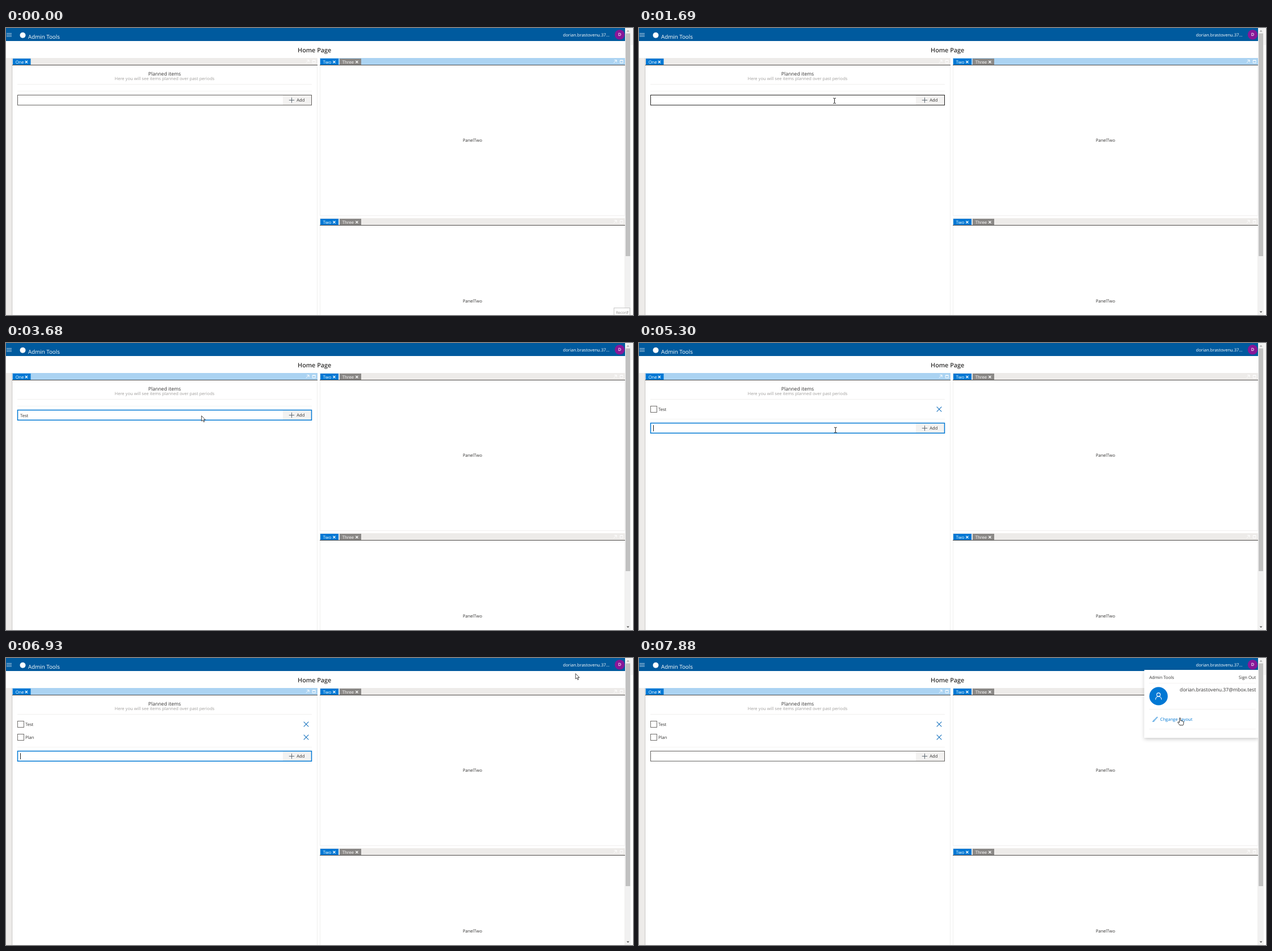
Write an HTML page that moves like this. It is 1105 px wide and 507 px high and loops after 8000 ms.

```html
<!DOCTYPE html>
<html lang="en">
<head>
<meta charset="utf-8">
<title>Admin Tools</title>
<style>
  html, body { margin: 0; width: 100%; height: 100%; overflow: hidden; background: #fff; }
  svg { display: block; width: 1105px; height: 507px; }
  text { font-family: "Open Sans", "Noto Sans", sans-serif; font-size: 7.6px; fill: #323130;
         text-rendering: geometricPrecision; white-space: pre; }
  .mid { text-anchor: middle; }
  .end { text-anchor: end; }
  .white { fill: #fff; }
  .line { fill: none; }
</style>
</head>
<body>
<svg id="stage" viewBox="0 0 1105 507" xmlns="http://www.w3.org/2000/svg"></svg>
<script>
const LOOP = 8000, BLUE = '#0078d4', GREY = '#edebe9', LIT = '#abd3f2';

const rect = (x, y, w, h, fill, more = '') =>
  `<rect x="${x}" y="${y}" width="${w}" height="${h}" fill="${fill}" ${more}/>`;
const path = (d, stroke, width, more = '') =>
  `<path class="line" d="${d}" stroke="${stroke}" stroke-width="${width}" ${more}/>`;
const text = (x, y, s, cls = '', more = '') => `<text x="${x}" y="${y}" class="${cls}" ${more}>${s}</text>`;
const size = (px, more = '') => `style="font-size:${px}px;${more}"`;
const cross = (x, y, r, stroke, width) =>
  path(`M${x - r} ${y - r}l${2 * r} ${2 * r}m0 ${-2 * r}l${-2 * r} ${2 * r}`, stroke, width);

function tab(x, y, w, label, fill) {
  return rect(x, y + 1, w, 11, fill) + text(x + 4.7, y + 9.8, label, 'white')
    + cross(x + w - 7.6, y + 7, 2.1, '#fff', 1.3);
}

function panelIcons(x, y) {
  return path(`M${x - 2.5} ${y + 2.5}l5 -5m-3.8 0h3.8v3.8`, '#fff', 1)
    + path(`M${x + 8.7} ${y - 2.3}h5v4.8h-5zm0 .6h5`, '#fff', 0.9);
}

function panel(id, x, y, h, tabs) {
  const w = 538;
  return rect(x + 0.5, y + 0.5, w - 1, h, '#fff', 'stroke="#f0efee"')
    + rect(x, y, w, 12, GREY, `id="${id}"`)
    + tabs + panelIcons(x + 520.5, y + 6.2)
    + rect(x, y + 12, w, 1, '#4c4a48');
}

const pair = y => tab(554, y, 32, 'Two', BLUE) + tab(588, y, 38, 'Three', '#8a8886');

function item(y, label) {
  return `<g visibility="hidden">`
    + rect(20.5, y - 5.5, 11, 11, '#fff', 'stroke="#605e5c" stroke-width=".9"')
    + text(34, y + 2.9, label) + cross(529, y, 4.3, '#1a74bf', 1.1) + '</g>';
}

const header = rect(0, 0, 1091, 23, '#005a9e')
  + path('M1 9.6h9m-9 2.6h9m-9 2.6h9', '#dfeaf4', 0.8)
  + '<circle cx="29.5" cy="12.7" r="5" fill="#fff"/>'
  + text(39, 18.9, 'Admin Tools', 'white', size(9.75))
  + text(1063.5, 14.5, 'dorian.brastovenu.37...', 'white end')
  + '<circle cx="1081.5" cy="11.7" r="8.8" fill="#881798"/>'
  + text(1081.4, 14.4, 'D', 'white mid', size(7.4, 'font-weight:600'))
  + text(543.7, 42.5, 'Home Page', 'mid', size(10.8, 'font-weight:600'));

const panels = rect(0, 53, 11, 454, GREY) + rect(10, 53, 1, 454, '#d2d0ce')
  + panel('left', 11, 53, 460, tab(12, 53, 31.5, 'One', BLUE))
  + panel('right', 553, 53, 278, pair(53))
  + panel('lower', 553, 336, 180, pair(336))
  + text(822, 201.4, 'PanelTwo', 'mid') + text(822, 485, 'PanelTwo', 'mid');

const list = text(279.5, 83.6, 'Planned items', 'mid', size(8.65))
  + text(279.5, 91.7, 'Here you will see items planned over past periods', 'mid', 'style="fill:#a19f9d"')
  + rect(20, 99, 519, 1, '#f1f0ef')
  + `<g id="items">${item(117, 'Test')}${item(140, 'Plan')}</g>`
  + '<g id="form">' + rect(20, 111, 519, 1, '#f4f3f2')
  + rect(488, 118.5, 50, 17.5, '#f3f2f1')
  + path('M498.8 127.5h9.4m-4.7 -4.7v9.4', '#4f5b66', 0.9)
  + text(512.3, 130.2, 'Add')
  + rect(20.5, 118.5, 518, 17.7, 'none', 'id="border"')
  + text(25, 130.8, '', '', 'id="typed"')
  + rect(25, 122, 1, 11, '#201f1e', 'id="caret"') + '</g>';

const scrollbar = rect(1091, 0, 10, 507, '#f1f1f1') + rect(1092, 9.5, 8, 393.5, '#c1c1c1')
  + '<path d="M1093.7 6.4l2.4 -2.6 2.4 2.6z" fill="#a3a3a3"/>'
  + '<path d="M1093.7 500.4l2.4 2.6 2.4 -2.6z" fill="#505050"/>'
  + rect(1101, 0, 4, 30, '#f6f5f5')
  + '<g id="tip">' + rect(1071.5, 494.5, 28, 16, '#fff', 'stroke="#c8c8c8" fill-opacity=".8"')
  + text(1075, 505.4, 'Record', '', size(6.5, 'fill:#8a8886')) + '</g>';

const menu = '<g clip-path="url(#page)"><g id="menu">'
  + rect(890.5, 21, 201, 120, '#fff', 'filter="url(#shade)"')
  + text(899.3, 37.4, 'Admin Tools') + text(1087.2, 37.4, 'Sign Out', 'end')
  + rect(899, 44, 188, 1, '#f4f3f2')
  + `<circle cx="915.6" cy="67.4" r="16.2" fill="${BLUE}"/>`
  + '<circle cx="915.6" cy="64.7" r="3.1" fill="none" stroke="#fff" stroke-width="1.1"/>'
  + path('M910.4 73.6c0 -7.6 10.4 -7.6 10.4 0', '#fff', 1.1)
  + text(1087.2, 59.4, 'dorian.brastovenu.37@mbox.test', 'end', size(8.65))
  + rect(899, 90, 188, 1, '#f1f0ef')
  + path('M908.6 108.7l4 -4.3q1.3 -.6 1 .8l-4 4.2zm0 .3q-2 .2 -1.9 2l-1.6 1.3q3.6 .4 4.2 -2.4', BLUE, 0.8)
  + text(918.6, 110.6, 'Chgange Layout', '', 'id="link"')
  + rect(899, 125, 188, 1, '#f4f3f2') + '</g></g>';

const shape = (id, d, fill, width) =>
  `<path id="${id}" d="${d}" fill="${fill}" stroke="#111" stroke-width="${width}" stroke-linejoin="round"/>`;
const pointers = '<g id="pointer">'
  + shape('arrow', 'M0 0V9.4L2.2 7.5 3.8 11 5.3 10.3 3.8 7H6.7Z', '#fff', 0.75)
  + shape('beam', 'M-2.4 -4.5H-.5L0 -4 .5 -4.5H2.4M0 -4V4M-2.4 4.5H-.5L0 4 .5 4.5H2.4', 'none', 0.95)
  + shape('hand', 'M-1.2 8.3V1.2a1.1 1.1 0 0 1 2.2 0V5.2q2 -.6 2 .4 1.8 -.4 1.8 .7 1.4 -.2 1.4 1V9.8'
    + 'q0 1.5 -1 3.2H-.6Q-2 11 -4 8.2q.2 -1.6 1.5 -.8Z', '#fff', 0.85)
  + '</g>';

document.getElementById('stage').innerHTML =
  '<defs><clipPath id="page"><rect width="1091" height="507"/></clipPath>'
  + '<filter id="shade" x="-10%" y="-15%" width="120%" height="130%">'
  + '<feDropShadow dx="0" dy="2.5" stdDeviation="3" flood-opacity=".2"/></filter></defs>'
  + rect(0, 0, 1105, 507, '#fff') + header + panels + list + scrollbar + menu + pointers;

const el = {};
for (const node of document.querySelectorAll('[id]')) el[node.id] = node;
const show = (node, on) => node.setAttribute('visibility', on ? 'visible' : 'hidden');
const set = (node, attrs) => { for (const k in attrs) node.setAttribute(k, attrs[k]); };

// start, end, number of steps, destination
const moves = [
  [250, 1000, 12, 659.5, 309.5],
  [1070, 1690, 10, 344.6, 128.6],
  [4210, 4210, 1, 344.6, 131],
  [4560, 4900, 5, 346.3, 153.7],
  [6240, 7000, 12, 1017, 25],
  [7070, 7070, 1, 1022.5, 18.7],
  [7550, 7880, 6, 953.6, 105.7]
];
const strokes = [
  [1830, ''], [2620, 'T'], [2750, 'Te'], [2950, 'Tes'], [3150, 'Test'],
  [5430, 'P'], [5500, 'Pl'], [5630, 'Pla'], [5770, 'Plan']
];
const commits = [3750, 6030];
// time, vertical offset, opacity
const opening = [[7350, -6.5, 0.1], [7410, -3.7, 0.36], [7480, -1.2, 0.75], [7550, -0.4, 0.93], [7610, 0, 1]];

const latest = (rows, t) => rows.filter(r => r[0] <= t).pop();

function pointerAt(t) {
  let x = 1080, y = 508;
  for (const [start, end, n, toX, toY] of moves) {
    if (t < start) break;
    const done = end > start ? Math.floor((t - start) / (end - start) * (n - 1) + 1e-6) + 1 : n;
    const k = Math.min(done / n, 1), e = k * k * (3 - 2 * k);
    x += (toX - x) * e;
    y += (toY - y) * e;
  }
  return [x, y];
}

function draw(t) {
  const count = commits.filter(c => c <= t).length;
  const shift = 23 * count, top = 118 + shift;
  const focus = t >= 1830 && t < 7350;
  const [x, y] = pointerAt(t);
  const submitting = t >= 3680 && t < 3750;
  const inside = x > 20 && x < 488 && y > top && y < top + 19 && !submitting;
  const overLink = t >= 7880;
  const kind = inside ? 'beam' : overLink || (t >= 7070 && t < 7550) ? 'hand' : 'arrow';

  show(el.tip, t < 70);
  set(el.left, { fill: t >= 1890 ? LIT : GREY });
  set(el.right, { fill: t >= 1890 ? GREY : LIT });

  [...el.items.children].forEach((row, i) => show(row, i < count));
  set(el.form, { transform: `translate(0 ${shift})` });
  set(el.border, {
    stroke: focus ? BLUE : inside ? '#201f1e' : '#605e5c',
    'stroke-width': focus ? 1.5 : 1
  });

  const [since, value] = latest(strokes, t) || [0, ''];
  el.typed.textContent = commits.some(c => c >= since && c <= t) ? '' : value;
  set(el.caret, { x: 25 + Math.floor(el.typed.getComputedTextLength()) });
  show(el.caret, focus && Math.floor((t - since) / 530) % 2 === 0);

  const [, drop, alpha] = latest(opening, t) || [0, 0, 0];
  set(el.menu, { transform: `translate(0 ${drop})`, opacity: alpha });
  el.link.style.fill = overLink ? BLUE : '#323130';

  set(el.pointer, { transform: `translate(${x} ${y})` });
  for (const name of ['arrow', 'beam', 'hand']) show(el[name], t >= 250 && name === kind);
}

const began = performance.now();
function tick() {
  draw((performance.now() - began) % LOOP);
  requestAnimationFrame(tick);
}
tick();
</script>
</body>
</html>
```
